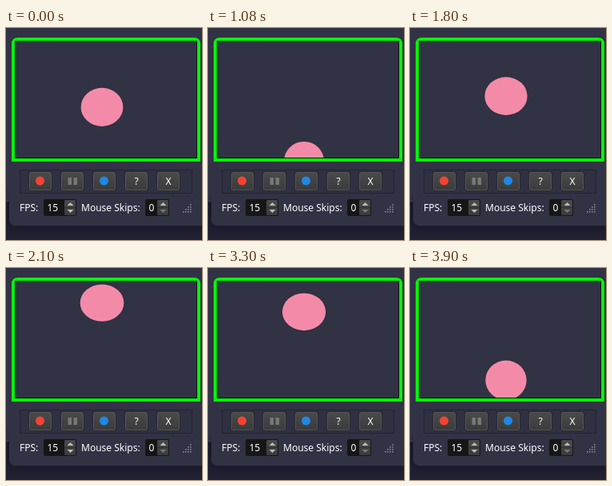
An HTML page for the animation above (3.96 s loop, 245 by 265 pixels).

```html
<!DOCTYPE html>
<html lang="en">
<head>
<meta charset="utf-8">
<title>Screen recorder</title>
<style>
html, body { margin: 0; width: 100%; height: 100%; overflow: hidden; background: #313244; }
svg { display: block; width: 245px; height: 265px; }
text { font: 12px "Noto Sans", "Open Sans", sans-serif; fill: #fff; }
</style>
</head>
<body>
<svg viewBox="0 0 245 265">
  <defs>
    <linearGradient id="face" x2="0" y2="1">
      <stop stop-color="#4a4a4a"/><stop offset="1" stop-color="#3b3b3b"/>
    </linearGradient>
    <linearGradient id="desk" x2="0" y2="1">
      <stop stop-color="#1a1a2a"/><stop offset="1" stop-color="#212133"/>
    </linearGradient>
    <filter id="soft" x="-10%" y="-20%" width="120%" height="140%"><feGaussianBlur stdDeviation="4"/></filter>
  </defs>
  <rect width="245" height="265" fill="#313244"/>
  <rect y="217" width="245" height="48" fill="url(#desk)"/>
  <path d="M0 216.5H8" stroke="#45465a"/>
  <ellipse id="ball" cx="120" fill="#f38ba8"/>
  <rect x="5" y="205" width="250" height="44" rx="8" fill="#11111c" opacity=".35" filter="url(#soft)"/>
  <path d="M4 163H245V247H12Q4 247 4 239Z" fill="#313244"/>
  <path d="M7 167V20Q7 12 15 12H235Q243 12 243 20V167ZM11 16V163H239V16Z" fill="#00f806" fill-rule="evenodd"/>
  <rect x="11.5" y="16.5" width="227" height="146" fill="none" stroke="#101018"/>
  <rect x="17.5" y="177.5" width="215" height="29" fill="#2f3041" stroke="#232432"/>
  <g id="buttons"></g>
  <circle cx="42.5" cy="191" r="5.5" fill="#f44336"/>
  <path d="M77.5 187h4.5v9h-4.5zM84.5 187h4.5v9h-4.5z" fill="#777"/>
  <circle cx="122.5" cy="191" r="5.5" fill="#1e88e5"/>
  <g text-anchor="middle"><text x="163" y="196">?</text><text x="203" y="196">X</text></g>
  <text x="17" y="229">FPS:</text>
  <text x="94" y="229">Mouse Skips:</text>
  <g id="spins"></g>
  <g id="grip" fill="#85868f"></g>
</svg>
<script>
const el = id => document.getElementById(id);

el('buttons').innerHTML = [29, 69, 109, 149, 189].map(x =>
  `<rect x="${x - .5}" y="179.5" width="29" height="24" rx="2" fill="#20202a"/>
   <rect x="${x + .5}" y="180.5" width="27" height="22" rx="1.5" fill="url(#face)" stroke="#555"/>`).join('');

const spin = (x, w, value, down) => {
  const a = x + w - 15, m = a + 7.5;
  return `<rect x="${x}" y="214" width="${w}" height="21" rx="2" fill="#161616"/>
    <rect x="${a}" y="215" width="14" height="19" rx="1.5" fill="url(#face)"/>
    <path d="M${a} 224.5h14" stroke="#303030"/>
    <path d="M${m - 4} 222l4-4 4 4z" fill="#bbb"/>
    <path d="M${m - 4} 227l4 4 4-4z" fill="${down}"/>
    <text x="${x + 4.5}" y="229">${value}</text>`;
};
el('spins').innerHTML = spin(47, 41, 15, '#bbb') + spin(174, 30, 0, '#777');

let dots = '';
for (let row = 0; row < 4; row++)
  for (let col = 3 - row; col < 4; col++)
    dots += `<rect x="${221 + col * 3}" y="${220 + row * 3}" width="1.6" height="1.6"/>`;
el('grip').innerHTML = dots;

// Inverse of the ease-in-out curve's x, then its y
function ease(x) {
  let lo = 0, hi = 1, s;
  for (let i = 0; i < 24; i++) {
    s = (lo + hi) / 2;
    const u = 1 - s;
    if (1.26 * s * u * u + 1.74 * s * s * u + s * s * s < x) lo = s; else hi = s;
  }
  return s * s * (3 - 2 * s);
}

const LOOP = 3960, STEP = 60, HALF = 1800, TOP_TIME = 2655;
const ball = el('ball'), start = performance.now();

function draw() {
  const t = Math.floor(Math.max(0, performance.now() - start) % LOOP / STEP) * STEP;
  const phase = (t - TOP_TIME + 4 * HALF) % (2 * HALF) / HALF;
  const p = ease(phase < 1 ? phase : 2 - phase);
  ball.setAttribute('cy', 12 + 160 * p);
  ball.setAttribute('rx', 27.9 - 2.8 * p);
  ball.setAttribute('ry', 22.6 + 2.6 * p);
  requestAnimationFrame(draw);
}
draw();
</script>
</body>
</html>
```
